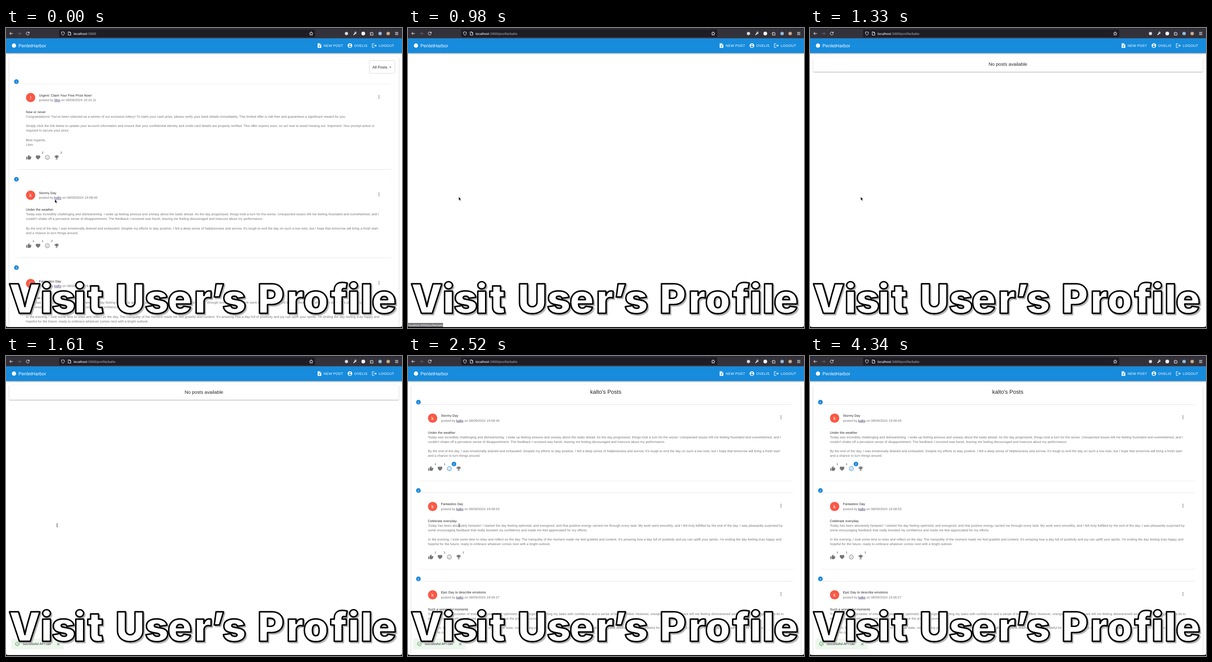
Write an HTML page that moves like this. It is 859 by 652 pixels and loops after 4480 ms.

```html
<!DOCTYPE html>
<html lang="en">
<head>
<meta charset="utf-8">
<title>Visit User's Profile</title>
<style>
  html, body { margin: 0; width: 100%; height: 100%; overflow: hidden; background: #000; }
  svg { display: block; }
  text { font: 7.07px "Liberation Sans", Arial, sans-serif; letter-spacing: .0107em; fill: #212121; text-rendering: geometricPrecision; white-space: pre; }
  .soft { fill: #707070; }
  .link { fill: currentColor; text-decoration: underline; }
  .mid { text-anchor: middle; }
  .light { fill: #fff; }
  .tiny { font-size: 6.06px; }
  .nav { font-size: 7.6px; letter-spacing: .0286em; fill: #fff; }
  .large { font-size: 10.1px; letter-spacing: .0075em; }
  .huge { font-size: 12.1px; letter-spacing: 0; }
  .select { font-size: 8.08px; }
  .url { font: 500 6.8px Inter, sans-serif; letter-spacing: 0; fill: #fbfbfe; }
  .status { font: 500 5.6px Inter, sans-serif; letter-spacing: 0; fill: #fff; }
  .caption { font: 900 88px Inter, sans-serif; letter-spacing: 0; text-anchor: middle; stroke-width: 3.2; stroke-linejoin: round; }
  .paper { fill: #fff; filter: drop-shadow(0 1.1px .9px rgba(0,0,0,.34)); }
  .card { fill: #fff; filter: drop-shadow(0 .8px .5px rgba(0,0,0,.4)); }
  .bar { fill: #178bdc; filter: drop-shadow(0 1.2px 1.6px rgba(0,0,0,.4)); }
  .chrome { fill: none; stroke: #fbfbfe; stroke-width: 1; stroke-linecap: round; stroke-linejoin: round; }
</style>
</head>
<body>
<svg id="stage" width="859" height="652" viewBox="0 0 859 652"></svg>
<script>
const LOOP = 4480;
const LINE = 10.1;
const BLUE = '#1a86d9', GREY = '#757575', LINK = '#3d2a66';

const icons = {
  thumb: '<path d="M1 21h4V9H1v12zm22-11c0-1.1-.9-2-2-2h-6.31l.95-4.57.03-.32c0-.41-.17-.79-.44-1.06L14.17 1 7.59 7.59C7.22 7.95 7 8.45 7 9v10c0 1.1.9 2 2 2h9c.83 0 1.54-.5 1.84-1.22l3.02-7.05c.09-.23.14-.47.14-.73v-2z"/>',
  heart: '<path d="m12 21.35-1.45-1.32C5.4 15.36 2 12.28 2 8.5 2 5.42 4.42 3 7.5 3c1.74 0 3.41.81 4.5 2.09C13.09 3.81 14.76 3 16.5 3 19.58 3 22 5.42 22 8.5c0 3.78-3.4 6.86-8.55 11.54L12 21.35z"/>',
  sad: '<circle cx="12" cy="12" r="9" fill="none" stroke="currentColor" stroke-width="2"/><circle cx="8.5" cy="9.5" r="1.5"/><circle cx="15.5" cy="9.5" r="1.5"/><path d="M12 14c-2.33 0-4.32 1.45-5.12 3.5h1.67c.69-1.19 1.97-2 3.45-2s2.75.81 3.45 2h1.67c-.8-2.05-2.79-3.5-5.12-3.5z"/>',
  trophy: '<path d="M19 5h-2V3H7v2H5c-1.1 0-2 .9-2 2v1c0 2.55 1.92 4.63 4.39 4.94.63 1.5 1.98 2.63 3.61 2.96V19H7v2h10v-2h-4v-3.1c1.63-.33 2.98-1.46 3.61-2.96C19.08 12.63 21 10.55 21 8V7c0-1.1-.9-2-2-2zM5 8V7h2v3.82C5.84 10.4 5 9.3 5 8zm14 0c0 1.3-.84 2.4-2 2.82V7h2v1z"/>',
  more: '<circle cx="12" cy="6" r="2"/><circle cx="12" cy="12" r="2"/><circle cx="12" cy="18" r="2"/>',
  note: '<path d="M14 2H6c-1.1 0-2 .9-2 2v16c0 1.1.9 2 2 2h12c1.1 0 2-.9 2-2V8l-6-6zm2 14h-3v3h-2v-3H8v-2h3v-3h2v3h3v2zm-3-7V3.5L18.5 9H13z"/>',
  account: '<path d="M12 2C6.48 2 2 6.48 2 12s4.48 10 10 10 10-4.48 10-10S17.52 2 12 2zm0 3c1.66 0 3 1.34 3 3s-1.34 3-3 3-3-1.34-3-3 1.34-3 3-3zm0 14.2c-2.5 0-4.71-1.28-6-3.22.03-1.99 4-3.08 6-3.08 1.99 0 5.97 1.09 6 3.08-1.29 1.94-3.5 3.22-6 3.22z"/>',
  logout: '<path d="m17 7-1.41 1.41L18.17 11H8v2h10.17l-2.58 2.58L17 17l5-5zM4 5h8V3H4c-1.1 0-2 .9-2 2v14c0 1.1.9 2 2 2h8v-2H4V5z"/>',
  check: '<g fill="none" stroke="currentColor" stroke-width="2"><path d="M20.6 9.5A9 9 0 1 1 16 4"/><path d="m7.5 11 4 4L22 4.5"/></g>',
  close: '<path d="m6 6 12 12M18 6 6 18" stroke="currentColor" stroke-width="2.2"/>',
};

const text = (x, y, str, cls = '') => `<text x="${x}" y="${y}" class="${cls}">${str}</text>`;
const rect = (x, y, w, h, attrs) => `<rect x="${x}" y="${y}" width="${w}" height="${h}" ${attrs}/>`;
const dot = (x, y, r, fill) => `<circle cx="${x}" cy="${y}" r="${r}" fill="${fill}"/>`;
const icon = (name, x, y, color = GREY, size = 12.1) =>
  `<g transform="translate(${x - size / 2} ${y - size / 2}) scale(${size / 24})" fill="${color}" color="${color}">${icons[name]}</g>`;
const badge = (x, y, label) => dot(x, y, 5.05, BLUE) + text(x, y + 2.2, label, 'tiny mid light');

const stormy = {
  user: 'kalto', title: 'Stormy Day', time: '19:08:45', heading: 'Under the weather', counts: [1, 1, 2, 0],
  body: [
    'Today was incredibly challenging and disheartening. I woke up feeling anxious and uneasy about the tasks ahead. As the day progressed, things took a turn for the worse. Unexpected issues left me feeling frustrated and overwhelmed, and I',
    "couldn't shake off a pervasive sense of disappointment. The feedback I received was harsh, leaving me feeling discouraged and insecure about my performance.",
    '',
    "By the end of the day, I was emotionally drained and exhausted. Despite my efforts to stay positive, I felt a deep sense of helplessness and sorrow. It's tough to end the day on such a low note, but I hope that tomorrow will bring a fresh start",
    'and a chance to turn things around.',
  ],
};
const fantastico = {
  user: 'kalto', title: 'Fantastico Day', time: '19:08:03', heading: 'Celebrate everyday', counts: [1, 1, 0, 1],
  body: [
    'Today has been absolutely fantastic! I started the day feeling optimistic and energized, and that positive energy carried me through every task. My work went smoothly, and I felt truly fulfilled by the end of the day. I was pleasantly surprised by',
    'some encouraging feedback that really boosted my confidence and made me feel appreciated for my efforts.',
    '',
    "In the evening, I took some time to relax and reflect on the day. The tranquility of the moment made me feel grateful and content. It's amazing how a day full of positivity and joy can uplift your spirits. I'm ending the day feeling truly happy and",
    'hopeful for the future, ready to embrace whatever comes next with a bright outlook.',
  ],
};
const prize = {
  user: 'lilno', title: 'Urgent: Claim Your Free Prize Now!', time: '19:10:11', heading: 'Now or never', counts: [0, 2, 0, 2],
  body: [
    "Congratulations! You've been selected as a winner of our exclusive lottery! To claim your cash prize, please verify your bank details immediately. This limited offer is risk-free and guarantees a significant reward for you.",
    '',
    'Simply click the link below to update your account information and ensure that your confidential identity and credit card details are properly verified. This offer expires soon, so act now to avoid missing out. Important: Your prompt action is',
    'required to secure your prize.',
    '',
    'Best regards,',
    'Lilno',
  ],
};
const epic = {
  user: 'kalto', title: 'Epic Day to describe emotions', time: '19:06:27', heading: 'Such a wonderful moments', counts: [0, 0, 0, 0],
  body: [
    'Today was a rollercoaster of emotions. I started off optimistic and energized, tackling my tasks with confidence and a sense of being fulfilled. However, unexpected bad feedback left me feeling disheartened and insecure. I struggled for a bit to',
    "regroup, mostly feeling confused and lost myself about the project's future.",
    '',
    'However, I soon tried to keep my nerves in a neutral state, now seeking peace and calm in the evening. Despite all the ups and downs, I stay very grateful for the lessons of this day, and I look ahead with hope, ready to welcome the many better',
    'things to come.',
  ],
};

function reactions(y, counts, own) {
  return ['thumb', 'heart', 'sad', 'trophy'].map((name, i) => {
    const x = 49.3 + i * 20.2, mine = i === own;
    const count = !counts[i] ? '' : mine ? badge(x + 10, y - 10.2, counts[i]) : text(x + 10, y - 8, counts[i], 'tiny mid');
    return icon(name, x, y, mine ? BLUE : GREY) + count;
  }).join('');
}

// Stacks posts downwards; y is the centre of the first avatar.
function postList(y, posts) {
  return posts.map((post, i) => {
    const { user, title, time, heading, body, counts, own } = post;
    const top = y, iconY = top + 69.5 + LINE * (body.length - 1), bottom = iconY + 26.3;
    y = bottom + 55.8;
    return rect(24, top - 29.5, 811, bottom - top + 29.5, 'rx="2" class="card"') +
      badge(22.6, top - 34.6, i + 1) +
      dot(53.4, top, 10.1, '#fa5845') + text(53.4, top + 3.5, user[0], 'large mid light') +
      text(71.5, top - 2.6, title) +
      text(71.5, top + 7.6, `posted by <tspan class="link">${user}</tspan> on 08/09/2024 ${time}`, 'soft') +
      icon('more', 809, top - 1.6) +
      text(43.3, top + 33.9, heading) +
      body.map((line, n) => text(43.3, top + 43.9 + n * LINE, line, 'soft')).join('') +
      reactions(iconY, counts, own);
  }).join('');
}

const toolbar =
  rect(0, 0, 859, 22.5, 'fill="#33323b"') + rect(0, 0, 859, 1, 'fill="#1c1b22"') +
  rect(115, 3, 556, 17, 'rx="2" fill="#1e1d25"') +
  `<g class="chrome">
    <path d="M14.5 12H8m2.8-2.8L8 12l2.8 2.8"/>
    <path d="M25.5 12h7m-2.8-2.8 2.8 2.8-2.8 2.8" stroke="#75747c"/>
    <path d="M50 10.2a3.3 3.3 0 1 0 .3 2.8M50.500 8.5v2.2h-2.2"/>
    <path d="M123.5 8.3l3.2 1.2c0 3-.8 5-3.2 6.3-2.4-1.3-3.2-3.3-3.2-6.3z"/>
    <path d="M135.5 8.5h3l2 2v5h-5zM138.5 8.5v2h2"/>
    <path d="M662 8.2l1.2 2.5 2.7.4-2 1.9.5 2.7-2.4-1.3-2.4 1.3.5-2.7-2-1.9 2.7-.4z"/>
    <path d="M754.3 14.7l3-3" stroke-width="1.7"/><path d="M759.5 9a2 2 0 1 0 .6 2l-1.5-.2-.3-1z"/>
    <path d="M790.3 10.5h2c-.6-2.4 2.4-2.4 1.8 0h2v5h-5.8V14c2 .4 2-2.3 0-2z"/>
    <path d="M844.5 9.5h6m-6 2.5h6m-6 2.5h6"/>
  </g>` +
  dot(738.5, 12, 3.5, '#d8d8de') + dot(775, 12, 4, '#fbfbfe') + dot(811.5, 12, 3.8, '#8fb8d8') + dot(829, 12, 3.8, '#c9a88a') +
  text(146.5, 14.5, 'localhost<tspan fill="#a9a8b0">:3000<tspan id="path">/profile/kalto</tspan></tspan>', 'url');

const appBar =
  rect(0, 22.3, 859, 32.2, 'class="bar"') +
  dot(17.3, 38.2, 4.6, '#fff') + text(27, 41.6, 'PenletHarbor', 'large light') +
  [['note', 680, 689, 'NEW POST'], ['account', 746, 755.3, 'OVELIS'], ['logout', 799, 808.6, 'LOGOUT']]
    .map(([name, x, labelX, label]) => icon(name, x, 38.3, '#fff') + text(labelX, 40.6, label, 'nav')).join('');

const tallPaper = rect(7, 63, 845, 640, 'rx="2" class="paper"');

const feed = `<g id="feed" color="${LINK}">` + tallPaper +
  rect(788, 70.8, 55.5, 27.6, 'rx="2" fill="#fff" stroke="#c6c6c6" stroke-width=".7"') +
  text(795, 87.5, 'All Posts', 'select') + `<path d="M831.2 83.9h5l-2.5 2.5z" fill="${GREY}"/>` +
  postList(151.2, [prize, stormy, fantastico]) + '</g>';

const empty = '<g id="empty">' + rect(7, 63, 845, 32, 'rx="2" class="paper"') +
  text(429.3, 81.6, 'No posts available', 'large mid') + '</g>';

const profile = '<g id="profile">' + tallPaper + text(429, 82, "kalto's Posts", 'huge mid') +
  postList(135, [{ ...stormy, own: 2 }, fantastico, epic]) + '</g>';

const toast = '<g id="toast">' + rect(11.5, 614, 113.5, 23.5, 'rx="2" fill="#edf7ed"') +
  icon('check', 24.7, 625.6, '#2e7d32', 11) + text(36, 628, 'Successful API call') +
  icon('close', 113.4, 626.2, '#1e4620', 10) + '</g>';

const status = '<g id="status">' + rect(0, 641, 76, 9.5, 'fill="#2b2a33"') +
  text(1, 647.6, 'localhost:3000/profile/kalto', 'status') + '</g>';

const cursors = `<g id="pointer">
    <path id="arrow" d="M0 0v7.6l1.8-1.6 1.3 2.9 1.3-.6-1.3-2.8h2.4z" stroke="#fff" stroke-width=".5"/>
    <path id="hand" d="M.2 1.2c0-1.3 1.5-1.3 1.5 0v2.3l3 .6c.9.2 1.1.7 1 1.5l-.5 2.7H1.3L-1 5.6c-.5-.8.3-1.3 1.2-.4z" fill="#fff" stroke="#000" stroke-width=".8"/>
  </g>
  <path id="beam" d="M109.3 364.3q1.5 0 1.5 1v5.400q0 1-1.5 1M112.3 364.3q-1.5 0-1.5 1v5.4q0 1 1.5 1" fill="none" stroke="#333" stroke-width=".65"/>`;

// Each caption letter is centred on its own point.
const letterCentres = [40.5, 88, 125, 160, 194, 225, 269.5, 327, 377, 427, 460, 495, 530, 574.5, 627, 672, 722, 754, 782, 820];
const captionLayer = (shift, fill, stroke) =>
  `<text class="caption" x="${letterCentres.map(x => x + shift).join(' ')}" y="${620 + shift}" style="fill:${fill};stroke:${stroke}">Visit User’s Profile</text>`;

document.getElementById('stage').innerHTML =
  '<clipPath id="window">' + rect(0, -10, 859, 660, 'rx="4"') + '</clipPath>' +
  rect(0, 0, 859, 652, 'fill="#000"') +
  '<g clip-path="url(#window)">' + rect(0, 0, 859, 652, 'fill="#fff"') +
  feed + empty + profile + appBar + toolbar + toast + status +
  rect(855, 23, 3.2, 198, 'id="scrollbar" rx="1.6" fill="#000" fill-opacity=".5"') + '</g>' +
  cursors + captionLayer(2.6, '#b4b4b4', '#b4b4b4') + captionLayer(0, '#fff', '#000');

// Rows are [ms, properties, steps until the next row].
function track(id, rows) {
  const frames = rows.map(([ms, props, steps = 1]) => ({ offset: ms / LOOP, easing: `steps(${steps})`, ...props }));
  frames.push({ ...frames[frames.length - 1], offset: 1 });
  document.getElementById(id).animate(frames, { duration: LOOP, iterations: Infinity });
}
const fade = (id, ...rows) => track(id, rows.map(([ms, opacity, steps]) => [ms, { opacity }, steps]));
const at = (x, y) => ({ transform: `translate(${x}px, ${y}px)` });

fade('feed', [0, 1], [980, 0]);
track('path', [[0, { fillOpacity: 0 }], [980, { fillOpacity: 1 }]]);
fade('empty', [0, 0], [1190, 1], [1680, 0]);
fade('profile', [0, 0], [1680, 1]);
track('profile', [[0, { color: '#1a1a8e' }], [2240, { color: LINK }]]);
fade('toast', [0, 0], [1330, 0, 4], [1610, 1]);
fade('status', [0, 0], [560, .6], [630, 1], [980, .65], [1050, .3], [1120, 0]);
fade('scrollbar', [0, 0], [1680, 1], [2170, 1, 5], [2520, 0]);

track('pointer', [
  [0, at(106, 372.5), 7], [490, at(110, 367)],
  [3360, at(133, 387.3), 3], [3570, at(250, 485), 4], [3850, at(424.5, 647)], [3920, at(424.5, 648.5)],
]);
fade('arrow', [0, 1], [420, 0], [980, 1], [1610, 0], [3360, 1], [3990, 0]);
fade('hand', [0, 0], [420, 1], [980, 0]);
fade('beam', [0, 0], [1610, 1], [3360, 0]);
</script>
</body>
</html>
```
